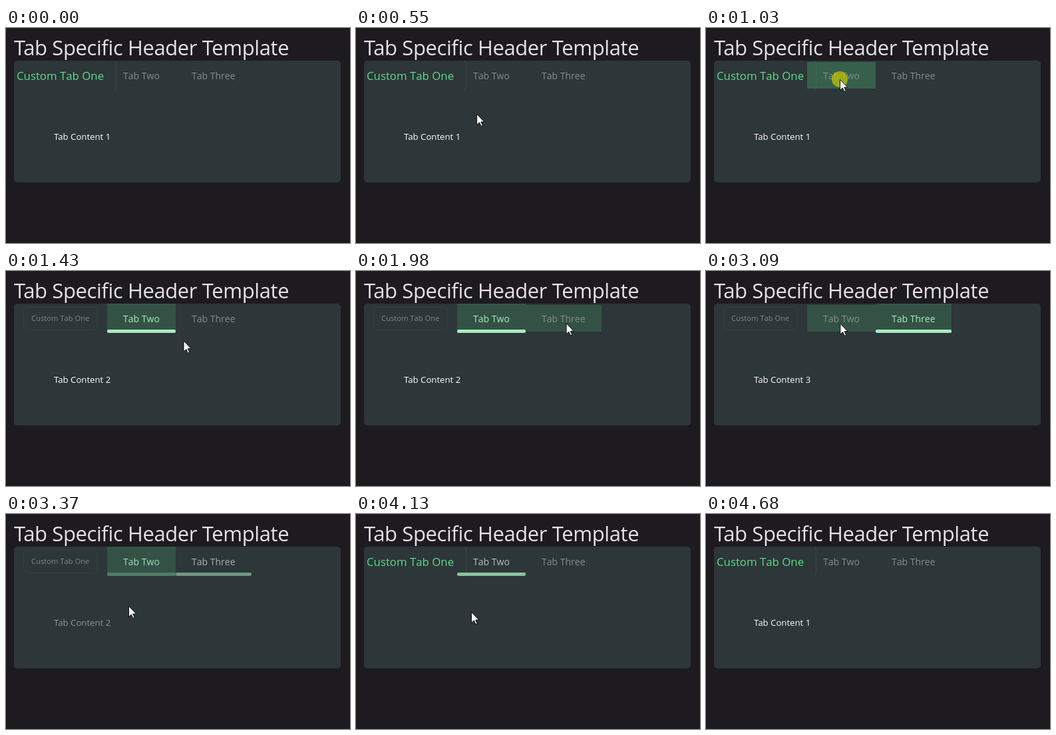
These frames come from a looping animation (517 by 323 pixels, 5.15 s). An HTML page:

```html
<!DOCTYPE html>
<html lang="en">
<head>
<meta charset="utf-8">
<title>Tab Specific Header Template</title>
<style>
  html, body { margin: 0; width: 100%; height: 100%; overflow: hidden; background: #1d1b20; }
  svg { display: block; width: 100%; height: 100%; }
  text { font: 14px "Open Sans", "Noto Sans", sans-serif; font-kerning: none; white-space: pre; }
  #title { font-size: 31px; font-kerning: normal; letter-spacing: -.4px; fill: #e6e1e6; }
  #content { font-size: 13.2px; font-kerning: normal; fill: #fff; }
</style>
</head>
<body>
<svg viewBox="0 0 517 323">
  <defs>
    <clipPath id="strip"><rect x="12" y="49" width="491" height="44.5"/></clipPath>
  </defs>
  <rect width="517" height="323" fill="#1d1b20"/>
  <text id="title" x="12" y="41">Tab Specific Header Template</text>
  <rect x="12" y="49" width="491" height="183" rx="5" fill="#2d3638"/>
  <g clip-path="url(#strip)">
    <g id="custom">
      <rect x="-69.5" y="-21.5" width="139" height="43" rx="8" fill="none" stroke="#3a4446"/>
      <text id="customText" x="-.4" y="5.6" text-anchor="middle">Custom Tab One</text>
    </g>
  </g>
  <g id="tabs"></g>
  <text id="content" x="72" y="168"></text>
  <g id="pointer">
    <circle id="press" r="12" fill="#c4c800"/>
    <path d="M.5 .5V16.6L4.3 13 6.9 18.6 9.2 17.6 6.7 12.1H11.7Z" fill="#fff" stroke="#000" stroke-width=".9"/>
  </g>
</svg>
<script>
const LOOP = 5150, TICK = 70, HOLD = 130;
const $ = id => document.getElementById(id);
const clamp = v => Math.max(0, Math.min(1, v));
const ramp = (t, a, b) => clamp((t - a) / (b - a));
const set = (el, attrs) => { for (const k in attrs) el.setAttribute(k, attrs[k]); };
const mix = (a, b, k) => `rgb(${a.map((v, i) => Math.round(v + (b[i] - v) * k))})`;

const GREY = [134, 140, 142], SOFT = [198, 206, 202], MINT = [166, 237, 193];

const CLICKS = [
  { at: 1030, tab: 1, x: 201, y: 77 },
  { at: 2110, tab: 2, x: 318, y: 75 },
  { at: 3230, tab: 1, x: 200, y: 77 },
  { at: 4060, tab: 0, x: 110, y: 77 }
];

// The pointer passes these turns and rests before each click
const TURNS = [
  [70, 287, 275], [550, 166, 108], [1500, 289, 114], [2670, 258, 147],
  [3370, 184, 138], [4130, 173, 147], [4270, 353, 237], [4610, 488, 300]
];
const PATH = TURNS
  .concat(...CLICKS.map(({ at, x, y }) => [[at - HOLD, x, y], [at, x, y]]))
  .sort((p, q) => p[0] - q[0]);
const [SHOW, HIDE] = [PATH[0][0], PATH[PATH.length - 1][0]];

function makeTab(index, x, width, label) {
  const make = (tag, attrs) => {
    const el = document.createElementNS("http://www.w3.org/2000/svg", tag);
    set(el, attrs);
    return $("tabs").appendChild(el);
  };
  const back = make("rect", { x, width, fill: "#45a26c" });
  const bar = make("rect", { x, width, y: 88, height: 5, rx: 2, fill: "#a6edc1" });
  const text = make("text", { x: x + 24, y: 77 });
  text.textContent = label;
  return { index, back, bar, text };
}

const tabs = [makeTab(1, 152, 103, "Tab Two"), makeTab(2, 255, 114, "Tab Three")];

function quantize(t) {
  const base = CLICKS.reduce((b, c) => c.at <= t ? c.at : b, 0);
  return base + Math.floor((t - base) / TICK) * TICK;
}

function pointerAt(t) {
  const i = PATH.findIndex(p => p[0] > t);
  if (i < 1) return [0, 0];
  const p = PATH[i - 1], q = PATH[i], k = ramp(t, p[0], q[0]);
  return [p[1] + (q[1] - p[1]) * k, p[2] + (q[2] - p[2]) * k];
}

function drawTab({ index, back, bar, text }, t, state) {
  const { current, previous, since, next, pressed } = state;
  const selected = current === index, leaving = previous === index;
  const hover = next && next.tab === index ? ramp(t, next.at - 400, next.at - 170) : 0;
  set(back, {
    y: selected ? 49 : 51,
    height: selected ? 44 : 40,
    opacity: pressed && next.tab === index ? 0.39 : selected ? 0.25 : 0.25 * hover
  });
  bar.setAttribute("opacity",
    selected ? ramp(since, 70, 330) : leaving ? 1 - ramp(since, 0, 300) : 0);
  text.setAttribute("fill", selected
    ? mix(GREY, MINT, ramp(since, 0, 170))
    : mix(SOFT, GREY, leaving ? ramp(since, 0, 300) : 1));
}

function draw(time) {
  const t = quantize(time);

  // A selection takes effect one tick after its click
  const done = CLICKS.filter(c => t >= c.at + TICK);
  const next = CLICKS[done.length];
  const history = [-1, 0, ...done.map(c => c.tab)];
  const [previous, current] = history.slice(-2);
  const since = done.length ? t - done[done.length - 1].at : LOOP;
  const pressed = !!next && t >= next.at;

  tabs.forEach(tab => drawTab(tab, t, { current, previous, since, next, pressed }));

  const first = current === 0;
  $("custom").setAttribute("transform", `translate(82 71) scale(${first ? 1.2 : 0.8})`);
  $("customText").setAttribute("fill", first ? "#5ade8c" : "#80878a");

  $("content").textContent = `Tab Content ${current + 1}`;
  $("content").setAttribute("opacity", ramp(since, 70, 220));

  set($("pointer"), {
    transform: `translate(${pointerAt(t)})`,
    visibility: t >= SHOW && t < HIDE ? "visible" : "hidden"
  });
  $("press").setAttribute("opacity", pressed ? 0.72 : 0);
}

const start = performance.now();
function loop() {
  draw((performance.now() - start) % LOOP);
  requestAnimationFrame(loop);
}
loop();
</script>
</body>
</html>
```
